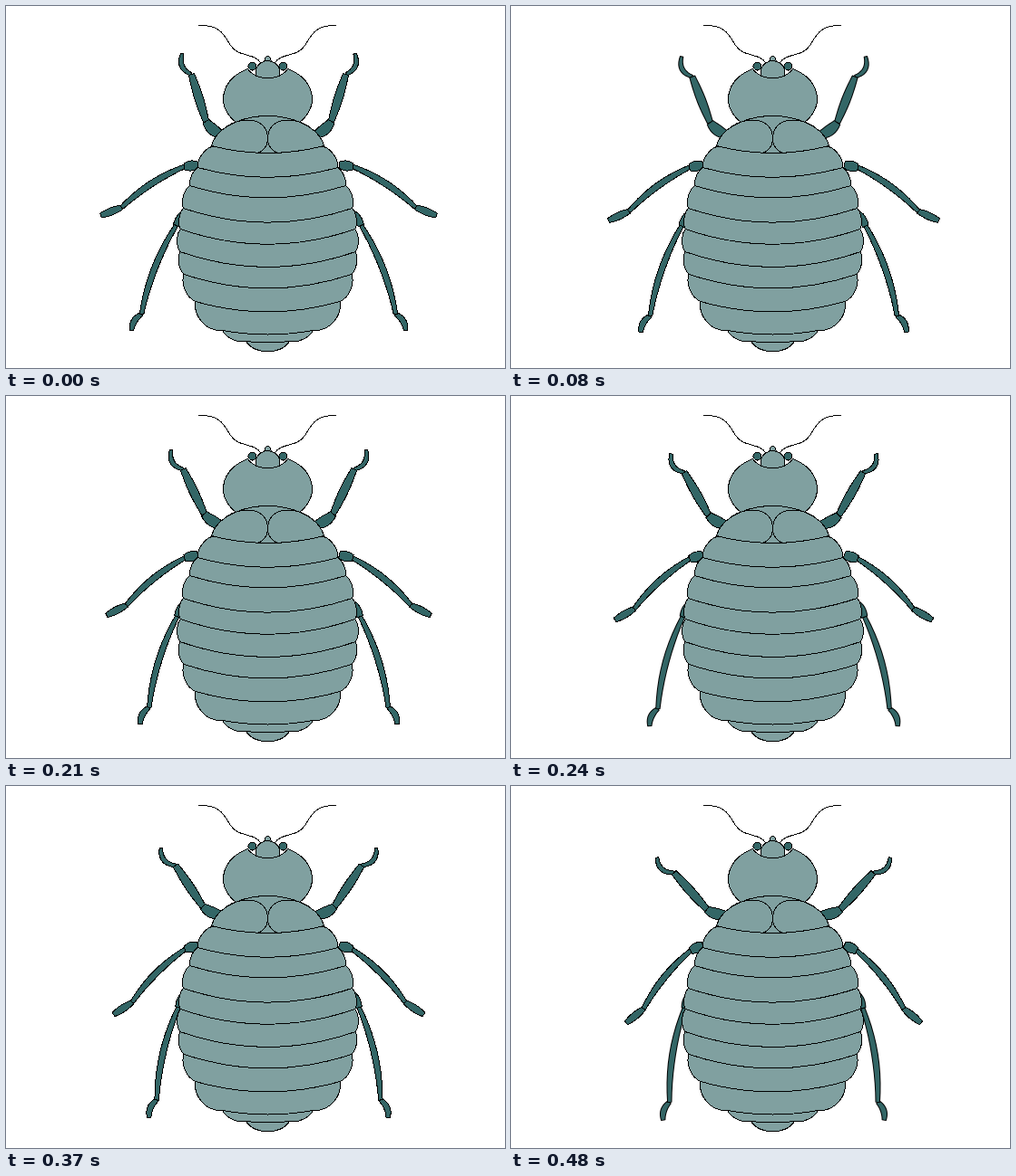
An HTML page that plays this animation: 550x400 px, repeating every 0.56 s.

```html
<!DOCTYPE html>
<html lang="en">
<head>
<meta charset="utf-8">
<title>Beetle</title>
<style>
  html, body { margin: 0; width: 100%; height: 100%; overflow: hidden; background: #fff; }
  svg { display: block; }
</style>
</head>
<body>
<svg width="550" height="400" viewBox="0 0 550 400" shape-rendering="crispEdges">
  <g id="bug" transform="translate(.5 .5)" stroke="#000" stroke-linejoin="round"></g>
</svg>
<script>
const SHELL = '#80a0a0', LIMB = '#336666';
const STEP = 80, STEPS = 7;
const BODY_AXIS = 288, LEG_AXIS = 289;
const bug = document.getElementById('bug');

function add(parent, tag, attrs) {
  const node = document.createElementNS('http://www.w3.org/2000/svg', tag);
  for (const key in attrs) node.setAttribute(key, attrs[key]);
  return parent.appendChild(node);
}
const draw = (d, fill = 'none', parent = bug) => add(parent, 'path', { d, fill });

// Calls paint once for the left half and once for its mirror image
function bothSides(axis, paint) {
  paint(add(bug, 'g', {}));
  paint(add(bug, 'g', { transform: `matrix(-1 0 0 1 ${2 * axis} 0)` }));
}

// Joints run hip, knee, ankle, toe; each bone between them has a bow and a half-thickness
const LEGS = [
  { turn: -4.1, joints: [[238, 142], [220, 127], [204, 75], [194, 52]], bones: [[2, 6], [0, 4.8], [6, 2.6]] },
  { turn: -3, joints: [[211, 175], [196, 177], [127, 222], [104, 231]], bones: [[0, 5.5], [-4, 3.5], [0, 4]] },
  { turn: -2.03, joints: [[203, 226], [187, 242], [149, 340], [138, 358]], bones: [[-2, 5], [-5, 3.4], [-3, 3.3]] }
];

// Tapered outline around a bowed line from a to b
function bone([ax, ay], [bx, by], [bow, thick]) {
  const dx = bx - ax, dy = by - ay, length = Math.hypot(dx, dy);
  const nx = dy / length, ny = -dx / length;
  const near = [], far = [], samples = 10;
  for (let i = 0; i <= samples; i++) {
    const t = i / samples, bend = 4 * bow * t * (1 - t), slope = 4 * bow * (1 - 2 * t);
    const x = ax + dx * t + nx * bend, y = ay + dy * t + ny * bend;
    const tx = dx + nx * slope, ty = dy + ny * slope;
    const k = thick * (0.65 + 0.35 * Math.sin(Math.PI * t)) / Math.hypot(tx, ty);
    near.push([x + ty * k, y - tx * k]);
    far.unshift([x - ty * k, y + tx * k]);
  }
  return `M${near.concat(far).join('L')}Z`;
}

const moving = [];
bothSides(LEG_AXIS, half => {
  for (const { turn, joints, bones } of LEGS) {
    const node = add(half, 'g', {});
    for (let i = bones.length - 1; i >= 0; i--)
      draw(bone(joints[i], joints[i + 1], bones[i]), LIMB, node);
    moving.push({ node, turn, hip: joints[0] });
  }
});

// Prothorax with a notch for the head
draw('M266,69 A49,37 0 1 0 310,69 C302,82 274,82 266,69Z', SHELL);

// Head, eyes and antennae
draw('M284,62 Q285,55 288,55 Q291,55 292,62Z', SHELL);
draw('M275,77 V70 C277,63 283,60 288,60 S300,64 301,70 V77 Q288,81 275,77Z', SHELL);
bothSides(BODY_AXIS, half => {
  add(half, 'circle', { cx: 271, cy: 66, r: 4.5, fill: LIMB });
  draw('M212,21 C236,20 240,32 247,43 C256,57 272,50 281,63', 'none', half);
});

// Abdomen: two half ellipses give the width, and wider seams sag more
const SEAMS = [155, 178, 198, 223, 246, 271, 296, 326, 358, 370];
const GIRTH = 97, WAIST = 262;

function spread(y) {
  const reach = y < WAIST ? 139 : 112;
  return Math.sqrt(1 - ((y - WAIST) / reach) ** 2);
}

function ring(top, bottom) {
  const a = GIRTH * spread(top), b = GIRTH * spread(bottom);
  const height = bottom - top, widen = b - a;
  const bulge = Math.hypot(height, widen) / 140;
  const out = a + height * bulge, drop = top - widen * bulge;
  const point = (side, w, y) => `${BODY_AXIS + side * w},${y}`;
  const upper = side => point(side, out + widen / 4, drop + height / 4);
  const lower = side => point(side, out + widen * 3 / 4, drop + height * 3 / 4);
  const sag = 17 * spread(bottom) ** 2;
  draw(`M${point(-1, a, top)}C${upper(-1)} ${lower(-1)} ${point(-1, b, bottom)}` +
       `Q${BODY_AXIS},${bottom + 2 * sag} ${point(1, b, bottom)}` +
       `C${lower(1)} ${upper(1)} ${point(1, a, top)}Z`, SHELL);
}

draw('M264,370 C274,385 302,385 312,370Z', SHELL);
for (let i = SEAMS.length - 1; i > 0; i--) ring(SEAMS[i - 1], SEAMS[i]);

// Mesothorax and wing pads
draw('M226,154 C232,132 262,121 288,121 S344,132 350,154 Q288,170 226,154Z', SHELL);
bothSides(BODY_AXIS, half =>
  draw('M240,135 C252,123 288,118 288,147 C288,154 283,160 277,162', 'none', half));

function render(time) {
  const step = Math.floor(time / STEP) % STEPS;
  for (const { node, turn, hip } of moving)
    node.setAttribute('transform', `rotate(${turn * step} ${hip})`);
}

const start = performance.now();
function tick() {
  render(performance.now() - start);
  requestAnimationFrame(tick);
}
tick();
</script>
</body>
</html>
```
